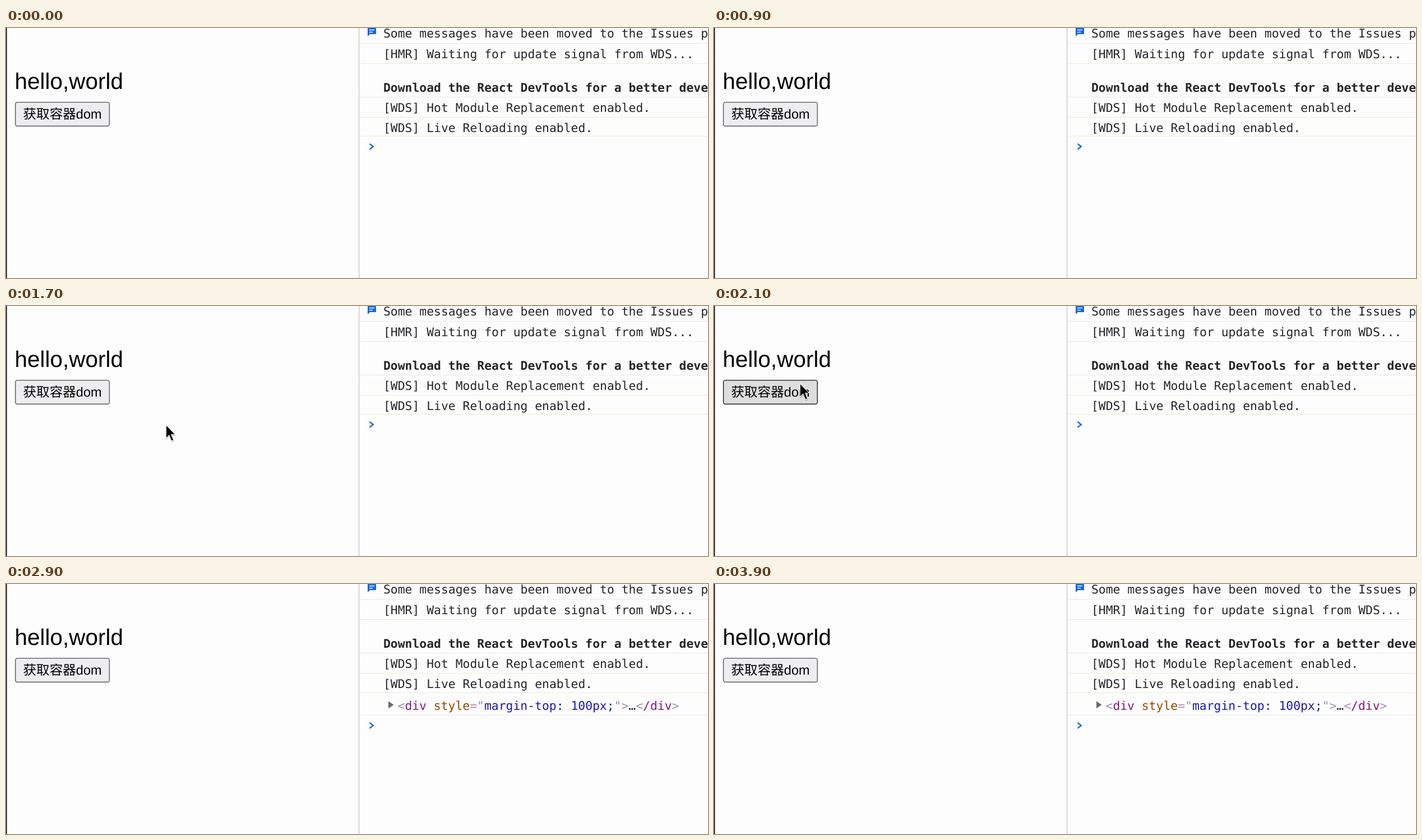
An HTML page for the animation above (4 s loop, 1252x447 px).

```html
<!DOCTYPE html>
<html lang="zh">
<head>
<meta charset="utf-8">
<title>Console demo</title>
<style>
  html, body { margin: 0; width: 100%; height: 100%; overflow: hidden; background: #fdfdfd; }
  svg { display: block; }
  text { white-space: pre; text-rendering: geometricPrecision; }
  .page { font-family: "Liberation Sans", "Noto Sans CJK SC", "Noto Sans CJK", sans-serif; fill: #000; }
  .console { font: 21.38px "DejaVu Sans Mono", monospace; fill: #242528; }
  .rule { stroke: #e8e8f1; }
  .rule.warm { stroke: #ececd9; }
  #button { fill: #eeeef0; stroke: #6b6b6e; stroke-width: 1.6; }
  #button.hover { fill: #dedede; stroke: #38383a; }
  .mark { fill: #a38fa8; }
  .tag { fill: #801a80; }
  .attr { fill: #994500; }
  .value { fill: #1a1aa6; }
</style>
</head>
<body>
<svg width="1252" height="447" viewBox="0 0 1252 447">
  <rect width="1.6" height="447" fill="#111"/>
  <rect x="629" width="1.2" height="447" fill="#c4c4c4"/>

  <g class="page">
    <text x="15.5" y="109" font-size="40.5">hello,world</text>
    <rect id="button" x="16.8" y="132.8" width="167.6" height="42.6" rx="3.5"/>
    <text x="30.5" y="162" font-size="23.6">获取容器dom</text>
  </g>

  <path d="M645-2H660V11H649L645 15Z" fill="#1a66dc"/>
  <path d="M648 3.5H657M648 7.5H654" stroke="#fff" stroke-width="1.6"/>

  <path class="rule" d="M630 27.5H1252M630 123.5H1252"/>
  <path class="rule warm" d="M630 63.5H1252M630 159.5H1252"/>
  <path class="rule warm" id="lastRule" d="M630 0H1252"/>

  <g class="console">
    <text x="673" y="16.5">Some messages have been moved to the Issues panel.</text>
    <text x="673" y="54">[HMR] Waiting for update signal from WDS...</text>
    <text x="673" y="114" font-weight="bold">Download the React DevTools for a better development</text>
    <text x="673" y="150">[WDS] Hot Module Replacement enabled.</text>
    <text x="673" y="185.5">[WDS] Live Reloading enabled.</text>
    <g id="output">
      <path d="M682 209.5L691.5 216L682 222.5Z" fill="#6b6b6b"/>
      <text x="698.5" y="224.5"><tspan class="mark">&lt;</tspan><tspan class="tag">div</tspan> <tspan class="attr">style</tspan><tspan class="mark">="</tspan><tspan class="value">margin-top: 100px;</tspan><tspan class="mark">"&gt;</tspan>…<tspan class="mark">&lt;</tspan><tspan class="tag">/div</tspan><tspan class="mark">&gt;</tspan></text>
      <path class="rule" d="M630 234.5H1252"/>
    </g>
  </g>

  <path id="prompt" d="M648.5-5L654.8 0L648.5 5" fill="none" stroke="#2270df" stroke-width="2.5"/>

  <g id="cursor">
    <path d="M0 0V25.5L5.6 20.2L9.8 30L14.6 28L10.4 18.4H18Z" fill="#000" opacity=".16" transform="translate(.8 2)"/>
    <path d="M1 2V23.2L6 18.3L10.3 28.5L13.2 27.2L9 17.2H15.8Z" fill="#000" stroke="#fff" stroke-width="1.8" paint-order="stroke"/>
  </g>
</svg>
<script>
  const LOOP = 4000, STEP = 100;
  const HOVER = [1900, 2500], LOG_AT = 2300;
  // Pointer path: time, x, y
  const path = [
    [1500, 290, 215], [1700, 285, 212], [1800, 217, 174], [1900, 166, 144],
    [2000, 153, 138], [2400, 153, 138], [2500, 180, 188], [2600, 232, 230]
  ];
  const [button, output, prompt, lastRule, cursor] =
    ['button', 'output', 'prompt', 'lastRule', 'cursor'].map(id => document.getElementById(id));

  const show = (el, on) => el.setAttribute('visibility', on ? 'visible' : 'hidden');
  const move = (el, x, y) => el.setAttribute('transform', `translate(${x} ${y})`);

  function pointerAt(t) {
    const i = path.findIndex(([time]) => time >= t);
    if (i < 0 || t < path[0][0]) return null;
    const [t1, x1, y1] = path[i], [t0, x0, y0] = path[Math.max(0, i - 1)];
    const k = t1 > t0 ? (t - t0) / (t1 - t0) : 1;
    return [x0 + (x1 - x0) * k, y0 + (y1 - y0) * k];
  }

  function draw(now) {
    const t = Math.floor(now % LOOP / STEP) * STEP;
    const logged = t >= LOG_AT, pointer = pointerAt(t);
    button.classList.toggle('hover', t >= HOVER[0] && t < HOVER[1]);
    show(output, logged);
    move(prompt, 0, logged ? 253 : 212);
    move(lastRule, 0, logged ? 194.5 : 193.5);
    show(cursor, pointer);
    if (pointer) move(cursor, ...pointer);
  }

  const start = performance.now();
  (function tick() {
    draw(performance.now() - start);
    requestAnimationFrame(tick);
  })();
</script>
</body>
</html>
```
